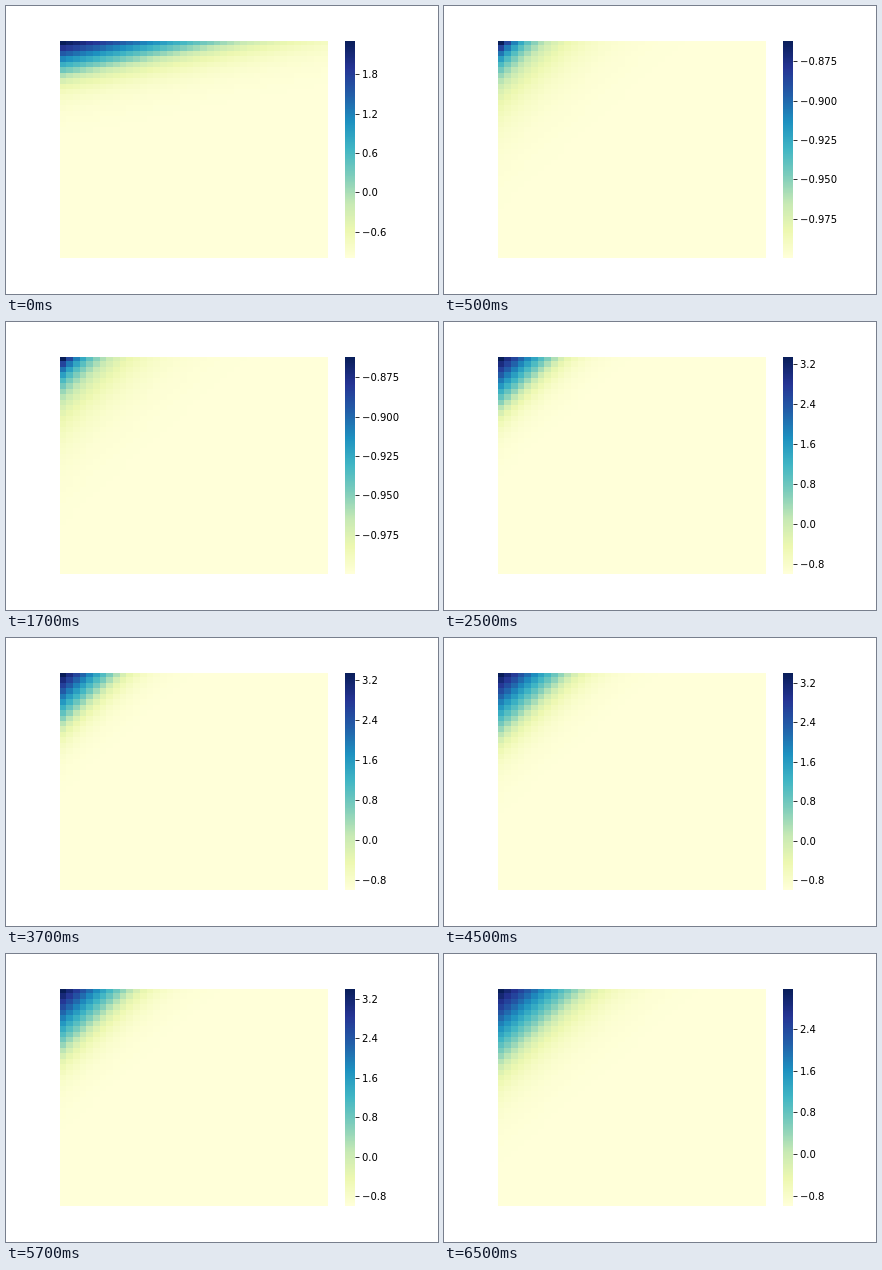
An HTML page with a canvas that plays this animation: 432x288 px, repeating every 8000 ms.

```html
<!DOCTYPE html>
<html lang="en">
<head>
<meta charset="utf-8">
<title>Heatmap</title>
<style>
  html, body { margin: 0; width: 100%; height: 100%; overflow: hidden; background: #fff; }
  canvas, svg { position: absolute; left: 0; top: 0; display: block; }
  text { font: 10px "DejaVu Sans", sans-serif; fill: #000; }
  path { stroke: #000; stroke-opacity: .8; stroke-width: 1; }
</style>
</head>
<body>
<canvas id="map" width="432" height="288"></canvas>
<svg id="axis" width="432" height="288" viewBox="0 0 432 288"></svg>
<script>
const LOOP = 8000;
const CELLS = 40;
const BOX = { x: 54, y: 34.56, w: 267.84, h: 217.44 };
const BAR = { x: 339, w: 10 };
const TOP = Math.round(BOX.y);
const RIGHT = Math.round(BOX.x + BOX.w);
const BOTTOM = BOX.y + BOX.h;

// Each state is elu(bias - dx * col - dy * row), with its colour bar ticks.
const states = [
  { at: 0,    bias: 2.313,  dx: .094, dy: .392, first: -.6,   step: .6,   ticks: 5, digits: 1 },
  { at: 500,  bias: -1.979, dx: .205, dy: .184, first: -.975, step: .025, ticks: 5, digits: 3 },
  { at: 2500, bias: 3.35,   dx: .386, dy: .35,  first: -.8,   step: .8,   ticks: 6, digits: 1 },
  { at: 4500, bias: 3.41,   dx: .322, dy: .294, first: -.8,   step: .8,   ticks: 6, digits: 1 },
  { at: 6500, bias: 3.18,   dx: .248, dy: .232, first: -.8,   step: .8,   ticks: 5, digits: 1 }
];

const ramp = ["ffffd9", "edf8b1", "c7e9b4", "7fcdbb", "41b6c4", "1d91c0", "225ea8", "253494", "081d58"]
  .map(hex => [0, 2, 4].map(i => parseInt(hex.slice(i, i + 2), 16)));

const ctx = document.getElementById("map").getContext("2d");
const axis = document.getElementById("axis");

const elu = u => u > 0 ? u : Math.exp(u) - 1;

function color(t) {
  const level = Math.max(0, Math.min(255, Math.floor(t * 256)));
  const p = level / 255 * (ramp.length - 1);
  const i = Math.min(Math.floor(p), ramp.length - 2);
  const rgb = ramp[i].map((c, k) => Math.round(c + (ramp[i + 1][k] - c) * (p - i)));
  return `rgb(${rgb})`;
}

// Every cell runs to the far edges; later cells cover the rest.
function drawMap(s, range) {
  for (let row = 0; row < CELLS; row++) {
    const y = Math.max(TOP, Math.floor(BOX.y + BOX.h * row / CELLS));
    for (let col = 0; col < CELLS; col++) {
      const x = Math.floor(BOX.x + BOX.w * col / CELLS);
      ctx.fillStyle = color((elu(s.bias - s.dx * col - s.dy * row) + 1) / range);
      ctx.fillRect(x, y, RIGHT - x, Math.round(BOTTOM) - y);
    }
  }
}

function drawBar() {
  for (let y = TOP; y < Math.round(BOTTOM); y++) {
    ctx.fillStyle = color((BOTTOM - y - .5) / BOX.h);
    ctx.fillRect(BAR.x, y, BAR.w, 1);
  }
}

function drawTicks(s, range) {
  let marks = "";
  for (let i = 0; i < s.ticks; i++) {
    const value = s.first + i * s.step;
    const y = Math.round(BOTTOM - (value + 1) / range * BOX.h);
    const sign = value < -1e-6 ? "\u2212" : "";
    const label = sign + Math.abs(value).toFixed(s.digits);
    marks += `<path d="M349.5 ${y + .5}h4"/><text x="356" y="${y + 4}">${label}</text>`;
  }
  axis.innerHTML = marks;
}

let shown = null;

function show(s) {
  const range = elu(s.bias) + 1;
  drawMap(s, range);
  drawTicks(s, range);
  shown = s;
}

function tick() {
  const t = performance.now() % LOOP;
  const s = states.filter(state => state.at <= t).pop();
  if (s !== shown) show(s);
  requestAnimationFrame(tick);
}

drawBar();
tick();
</script>
</body>
</html>
```
